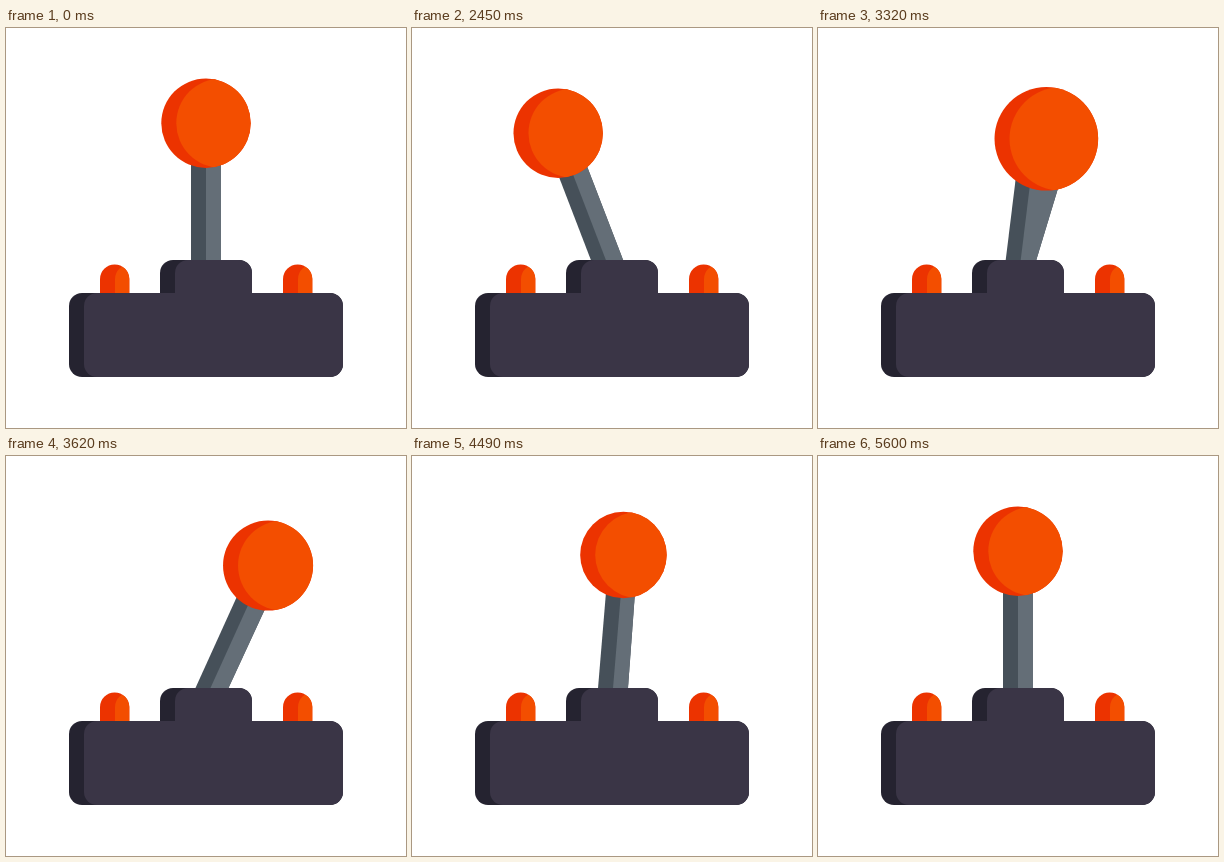
These frames come from a looping animation (400 by 400 pixels, 5630 ms). An HTML page with a canvas:

```html
<!DOCTYPE html>
<html lang="en">
<head>
<meta charset="utf-8">
<title>Joystick</title>
<style>
  html, body { margin: 0; width: 100%; height: 100%; overflow: hidden; background: #fff; }
  canvas { display: block; width: 400px; height: 400px; }
</style>
</head>
<body>
<canvas id="stage" width="400" height="400"></canvas>
<script>
const ctx = document.getElementById('stage').getContext('2d');

const LOOP = 5630, REST = 2000, STEP = 30, LAST = 120;
const SHADE = 15;
const PIVOT = { x: 200, y: 245 };
const LENGTH = 149.8, REACH = 63.2;

const ORANGE = ['#ec3300', '#f34e00'];
const STEEL = ['#465059', '#646e77'];
const PLUM = ['#252330', '#3a3546'];

const CENTER = { x: 200, y: 95.2, r: 44.7 };
const FRONT = { x: 200, y: 111, r: 53.6 };
const RIGHT = { x: 200 + REACH, y: 109.2, r: 44.7 };
const BACK_RIGHT = { x: 257.5, y: 114.5, r: 37.4 };

const ease = p => p * p * (3 - 2 * p);
const lerp = (a, b, p) => a + (b - a) * p;
const mix = (a, b, p) => ({ x: lerp(a.x, b.x, p), y: lerp(a.y, b.y, p), r: lerp(a.r, b.r, p) });

function tiltLeft(p) {
  const angle = p * Math.asin(REACH / LENGTH);
  return { x: PIVOT.x - LENGTH * Math.sin(angle), y: PIVOT.y - LENGTH * Math.cos(angle), r: CENTER.r };
}

// Half turn from left, past the viewer, to the right.
function sweep(p) {
  const angle = p * Math.PI, near = Math.sin(angle);
  return {
    x: 200 - REACH * Math.cos(angle),
    y: lerp(RIGHT.y, FRONT.y, near),
    r: lerp(RIGHT.r, FRONT.r, near * near)
  };
}

function throughCenter(p) {
  return p < 0.5 ? mix(BACK_RIGHT, CENTER, p * 2) : mix(CENTER, FRONT, p * 2 - 1);
}

const MOVES = [
  [0, 20, tiltLeft],
  [20, 60, sweep],
  [60, 70, p => mix(RIGHT, BACK_RIGHT, p)],
  [70, 100, throughCenter],
  [100, 120, p => mix(FRONT, CENTER, p)]
];

function knobAt(step) {
  const [from, to, move] = MOVES.find(m => step <= m[1]);
  return move(ease((step - from) / (to - from)));
}

// The lit part is the overlap of a shape with its copy moved to the right.
function shaded(path, [dark, light]) {
  ctx.fillStyle = dark;
  ctx.fill(path);
  ctx.save();
  ctx.clip(path);
  ctx.translate(SHADE, 0);
  ctx.fillStyle = light;
  ctx.fill(path);
  ctx.restore();
}

function box(x, y, w, h, radii) {
  const path = new Path2D();
  path.roundRect(x, y, w, h, radii);
  return path;
}

function disc({ x, y, r }) {
  const path = new Path2D();
  path.arc(x, y, r, 0, Math.PI * 2);
  return path;
}

function stick(knob) {
  const dx = knob.x - PIVOT.x, dy = knob.y - PIVOT.y, length = Math.hypot(dx, dy);
  const nx = -dy / length, ny = dx / length;
  const growth = knob.r - CENTER.r;
  const top = (30 + growth * (growth > 0 ? 3 : 1)) / 2;
  const foot = (30 - Math.max(0, growth) * 0.33) / 2;
  const path = new Path2D();
  path.moveTo(PIVOT.x - nx * foot, PIVOT.y - ny * foot);
  path.lineTo(knob.x - nx * top, knob.y - ny * top);
  path.lineTo(knob.x + nx * top, knob.y + ny * top);
  path.lineTo(PIVOT.x + nx * foot, PIVOT.y + ny * foot);
  path.closePath();
  return path;
}

const BUTTONS = [94, 277].map(x => box(x, 236.5, 29.3, 32, [14.6, 14.6, 0, 0]));
const HUB = box(154, 232, 92, 35, [13, 13, 0, 0]);
const BASE = box(63, 265, 274, 84, 13);

function draw(time) {
  const step = Math.min(LAST, Math.max(0, Math.floor((time % LOOP - REST) / STEP)));
  const knob = knobAt(step);
  ctx.fillStyle = '#fff';
  ctx.fillRect(0, 0, 400, 400);
  BUTTONS.forEach(button => shaded(button, ORANGE));
  shaded(stick(knob), STEEL);
  shaded(HUB, PLUM);
  shaded(BASE, PLUM);
  shaded(disc(knob), ORANGE);
}

const start = performance.now();
function tick() {
  draw(performance.now() - start);
  requestAnimationFrame(tick);
}
tick();
</script>
</body>
</html>
```
